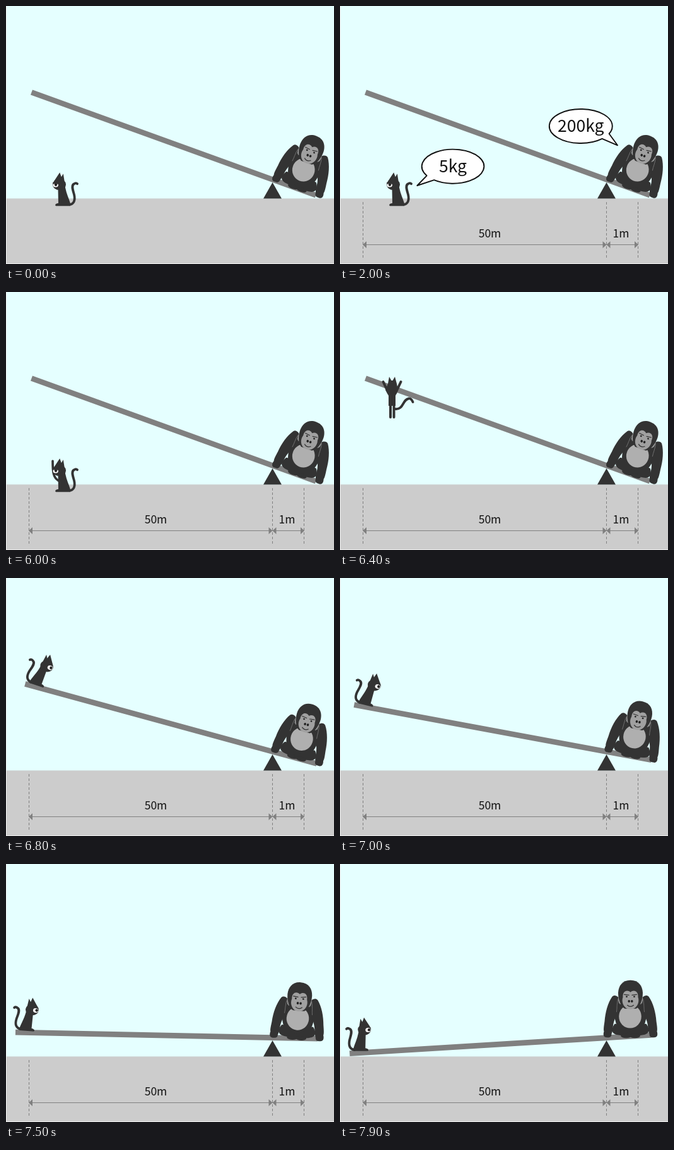
An HTML page with a canvas for the animation above (9.9 s loop, 520x408 px).

```html
<!DOCTYPE html>
<html lang="en">
<head>
<meta charset="utf-8">
<title>Lever: cat and gorilla</title>
<style>
html, body { margin: 0; width: 100%; height: 100%; overflow: hidden; background: #fff; }
canvas { display: block; width: 520px; height: 408px; }
</style>
</head>
<body>
<canvas id="stage"></canvas>
<script>
const W = 520, H = 408, LOOP = 9900;
const DARK = '#333', GRAY = '#808080', FACE = '#a0a0a0', BELLY = '#afafaf';
const SKY = '#e5ffff', GROUND = '#ccc', EDGE = '#f0f0f0';
const PIVOT = { x: 422.5, y: 279 };
const FONT = '"Noto Sans CJK JP", "Noto Sans CJK", "Noto Sans", sans-serif';

const canvas = document.getElementById('stage');
const dpr = window.devicePixelRatio || 1;
canvas.width = W * dpr;
canvas.height = H * dpr;
const ctx = canvas.getContext('2d');

// Each step holds until the next: beam tilt, gorilla position and lean
const tilts = [
  { at: 0, beam: 19.85, x: 472.3, y: 259, lean: 20 },
  { at: 6800, beam: 15.25, x: 469.5, y: 254.4, lean: 16.5 },
  { at: 7000, beam: 10.5, x: 467.5, y: 250.8, lean: 12.5 },
  { at: 7200, beam: 5.8, x: 465.3, y: 247.4, lean: 8.4 },
  { at: 7500, beam: 1.2, x: 463, y: 244, lean: 4.3 },
  { at: 7900, beam: -3.5, x: 460.5, y: 240.8, lean: 0 }
];

const catBody = new Path2D('M-15-38L-5.8-52L-3.2-45L-0.2-50L2-36L3-28C5-18 9-10 11-3V1H-12C-14-1-12-3-8-3.500L-8.500-26Z');
const catTail = new Path2D('M9-1C17-2 19-8 17-17C15-24 12-32 17-34C19-35.500 21-35 22-34');
const catArm = new Path2D('M-8-17C-16-22-17-30-17-48');
const hangBody = new Path2D('M76 145L78 134L81.500 140H83.500L87 134L90 145L92 155L88 164V180H77V164L72 155Z');
const hangLimbs = new Path2D('M68.500 142L77 160M96.500 142L88 160M80 178V198M85.500 178V198');
const hangTail = new Path2D('M88 185C101 186 99 170 109 168.500C113 168 114 171 115.500 174');

const arm = new Path2D('M-18-29C-22-33-26-34-29-31C-36-21-40-6-41 8C-42 15-43 21-42 24C-44 30-42 34-37 33.500C-32 34-30 32-30 28L-28 22C-28 12-25 2-20-4Z');
const armGap = new Path2D('M-20-27C-22-19-21-13-22-7');
const ear = new Path2D('M-18-32C-19.500-27-18-22-16-20');
const leg = new Path2D('M-25 12C-31 20-31 28-20 29.500C-9 31-6 33 3 31L5 24C-6 24-13 18-16 12Z');
const head = new Path2D('M0-57C-13-57-19-48-19.500-37C-19.500-27-16-16-9-12H9C16-16 19.500-27 19.500-37C19-48 13-57 0-57Z');
const face = new Path2D('M0-38C-5-43-13-40-12-30C-15-22-10-11 0-11C10-11 15-22 12-30C13-40 5-43 0-38Z');
const brows = new Path2D('M-10-34.500L-2.500-33.500M10-34.500L2.500-33.500');
const mouth = new Path2D('M-5-17.500C-2-15 2-15 5-17.500');

function at(x, y, deg, draw, flip = 1) {
  ctx.save();
  ctx.translate(x, y);
  ctx.rotate(deg * Math.PI / 180);
  ctx.scale(flip, 1);
  draw();
  ctx.restore();
}

function fill(path, color = DARK) {
  ctx.fillStyle = color;
  ctx.fill(path);
}

function line(path, width, color = DARK) {
  ctx.lineWidth = width;
  ctx.strokeStyle = color;
  ctx.stroke(path);
}

function oval(x, y, rx, ry, color) {
  ctx.fillStyle = color;
  ctx.beginPath();
  ctx.ellipse(x, y, rx, ry, 0, 0, 7);
  ctx.fill();
}

function poly(color, ...pts) {
  ctx.fillStyle = color;
  ctx.beginPath();
  for (let i = 0; i < pts.length; i += 2) ctx.lineTo(pts[i], pts[i + 1]);
  ctx.fill();
}

function text(str, x, y, size) {
  ctx.font = size + 'px ' + FONT;
  ctx.textAlign = 'center';
  ctx.fillStyle = '#111';
  ctx.fillText(str, x, y);
}

function sittingCat(raised, sleepy) {
  if (raised) line(catArm, 3.6);
  line(catTail, 3.8);
  fill(catBody);
  oval(-6.5, -33, 10.5, 8.8, DARK);
  oval(-12.3, -32.3, 4.2, 3.5, '#fff');
  oval(sleepy ? -12 : -13.8, -32.6, 2.2, 2.3, '#222');
  if (sleepy) poly(DARK, -17, -36, -7, -37, -7, -33.5, -17, -34);
}

function hangingCat() {
  line(hangTail, 3.8);
  line(hangLimbs, 4);
  fill(hangBody);
}

function bothSides(draw) {
  for (const side of [1, -1]) at(0, 0, 0, draw, side);
}

function gorilla() {
  oval(0, -1, 25, 30, DARK);
  bothSides(() => {
    fill(arm);
    line(armGap, 0.8, '#777');
  });
  oval(-0.5, 0.3, 17.8, 18.5, BELLY);
  bothSides(() => {
    fill(leg);
    oval(-7, 31, 8.5, 3.5, DARK);
  });
  bothSides(() => line(ear, 2, FACE));
  fill(head);
  fill(face, FACE);
  line(brows, 1.2);
  line(mouth, 1.2);
  bothSides(() => {
    oval(-6, -31, 1.4, 1.3, '#222');
    oval(-2.3, -23.8, 1.8, 2, '#222');
  });
}

function scenery() {
  ctx.fillStyle = EDGE;
  ctx.fillRect(0, 0, W, H);
  ctx.fillStyle = SKY;
  ctx.fillRect(1, 0, W - 1, 305);
  ctx.fillStyle = GROUND;
  ctx.fillRect(1, 304.4, W - 1, 102.6);
}

function measures() {
  ctx.save();
  ctx.lineCap = 'butt';
  ctx.setLineDash([4, 3]);
  for (const x of [36.5, 422.5, 472.5]) line(new Path2D(`M${x} 310V400`), 1, GRAY);
  ctx.restore();
  line(new Path2D('M38 377.500H471'), 1, GRAY);
  for (const [tip, dir] of [[36, 1], [422.5, -1], [422.5, 1], [473, -1]]) {
    poly(GRAY, tip, 377.5, tip + 6 * dir, 372, tip + 6 * dir, 383);
  }
  text('50m', 237.5, 365.5, 17.5);
  text('1m', 445.5, 365.5, 17.5);
}

// Ellipse with a pointed tail between angles a and b
function bubble(x, y, rx, ry, a, b, tipX, tipY, str, textY) {
  ctx.beginPath();
  ctx.ellipse(x, y, rx, ry, 0, b, a + 2 * Math.PI);
  ctx.lineTo(tipX, tipY);
  ctx.closePath();
  ctx.fillStyle = '#fff';
  ctx.fill();
  ctx.lineWidth = 1.9;
  ctx.strokeStyle = '#111';
  ctx.stroke();
  text(str, x, textY, 26.5);
}

function cat(t, beam) {
  if (t < 6200) {
    at(91, 315.2, 0, () => sittingCat(t >= 6000, true));
  } else if (t < 6600) {
    const drop = t < 6300 ? 78 : t < 6400 ? 39 : 0;
    at(0, drop, 0, hangingCat);
  } else {
    const hop = t < 6800;
    at(PIVOT.x - (hop ? 4 : 0), PIVOT.y - (hop ? 8 : 0), beam, () =>
      at(-390.5, -8, 3.5, () => sittingCat(false, false), -1));
  }
}

function render(t) {
  ctx.setTransform(dpr, 0, 0, dpr, 0, 0);
  ctx.lineCap = ctx.lineJoin = 'round';
  const pose = tilts.filter(p => p.at <= t).pop();

  scenery();
  poly(DARK, PIVOT.x, 279, 437, 304.4, 408, 304.4);
  at(PIVOT.x, PIVOT.y, pose.beam, () => {
    ctx.fillStyle = GRAY;
    ctx.fillRect(-407.7, -8.7, 479.3, 8.7);
  });
  at(pose.x, pose.y, pose.lean, gorilla);
  cat(t, pose.beam);

  if (t >= 2000) measures();
  if (t >= 2000 && t < 5000) {
    bubble(179, 253.7, 49.3, 27, 2.22, 2.57, 122.3, 284, '5kg', 263);
    bubble(381.8, 190, 50, 27, 0.46, 0.83, 440, 220.3, '200kg', 199);
  }
}

const start = performance.now();
function tick() {
  render((performance.now() - start) % LOOP);
  requestAnimationFrame(tick);
}
tick();
</script>
</body>
</html>
```
